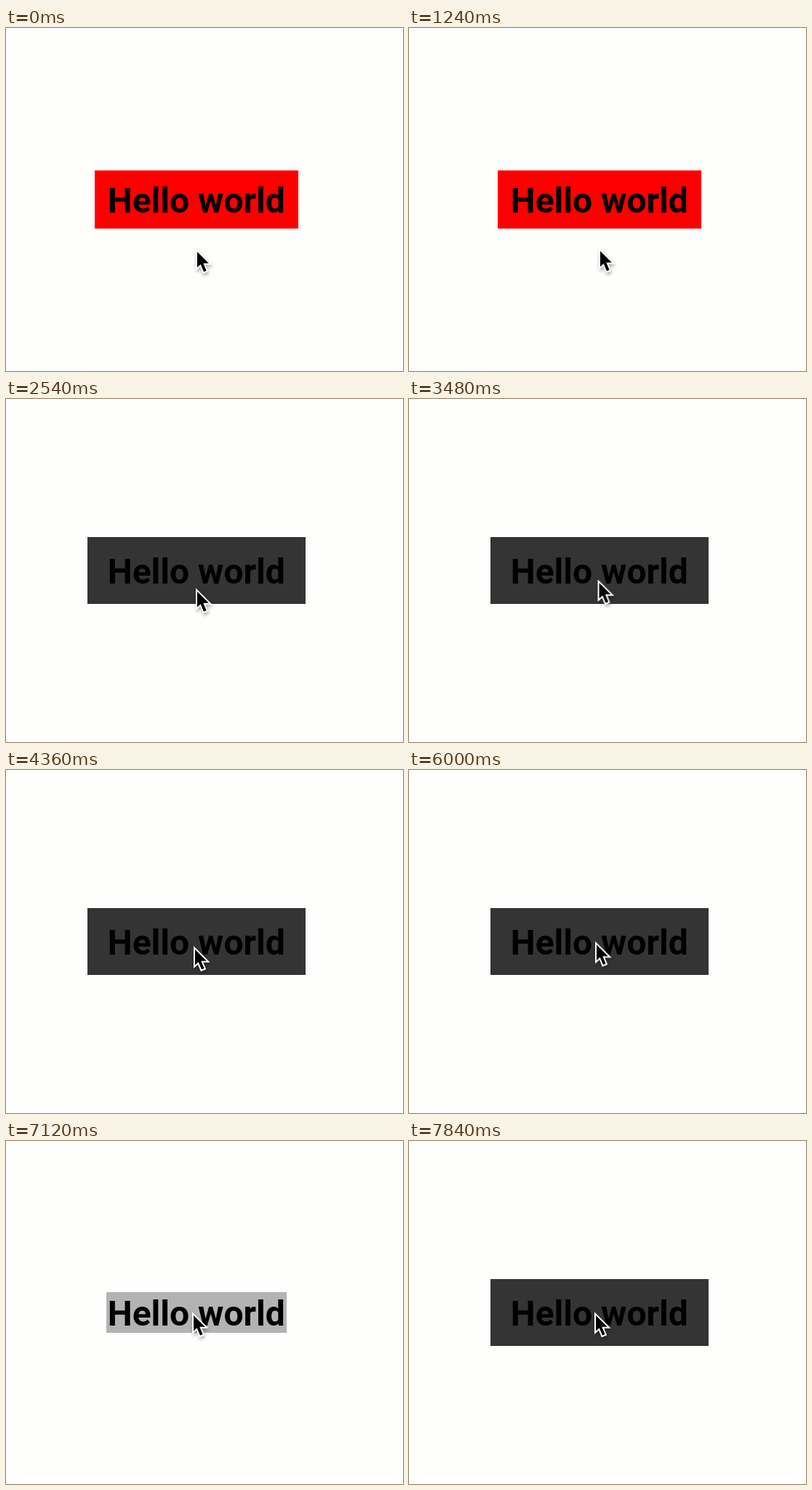
Write an HTML page that moves like this. It is 546 px wide and 472 px high and loops after 8 s.

```html
<!DOCTYPE html>
<html lang="en">
<head>
<meta charset="utf-8">
<title>Hello world</title>
<style>
  html, body { margin: 0; width: 100%; height: 100%; overflow: hidden; background: #fefefc; }
  #box, #label, #cursor { position: absolute; }
  #label { left: 0; top: 0; }
  #label text { font: 700 48px Roboto, Arial, sans-serif; }
  #cursor { left: 0; top: 0; overflow: visible; filter: drop-shadow(1px 3px 2px rgba(0, 0, 0, .3)); }
  #cursor path { stroke: #fff; stroke-width: 4; stroke-miterlimit: 8; paint-order: stroke; }
</style>
</head>
<body>
<div id="box"></div>
<svg id="label" width="546" height="472"><text x="139.7" y="254">Hello world</text></svg>
<svg id="cursor" width="24" height="38">
  <path d="M2 5V26.5L6.7 22.2L11 32.6L14.6 31.1L10.3 20.8H17.8Z"/>
</svg>
<script>
const LOOP = 8000;
const byId = id => document.getElementById(id);

// Box looks: padding around the text line, and colour
const look = (padX, padY, backgroundColor) => ({
  left: 138 - padX + 'px',
  top: 208 - padY + 'px',
  width: 248 + 2 * padX + 'px',
  height: 56 + 2 * padY + 'px',
  backgroundColor
});
const idle = look(16, 12, '#ff0000');
const hover = look(26, 18, '#343434');
const press = look(0, 0, '#b3b3b3');
const at = (x, y) => ({ transform: `translate(${x}px, ${y}px)` });

// Each step: [time in ms, style, easing towards the next step]
function play(el, steps) {
  const frames = steps.map(([ms, style, easing = 'linear']) =>
    ({ ...style, offset: ms / LOOP, easing }));
  el.animate(frames, { duration: LOOP, iterations: Infinity });
}

play(byId('box'), [
  [0, idle],
  [2090, idle, 'ease'],
  [2540, hover],
  [6420, hover, 'ease'],
  [6980, press],
  [7260, press, 'ease'],
  [7820, hover],
  [LOOP, hover]
]);

play(byId('cursor'), [
  [0, at(261, 303)],
  [160, at(261, 303)],
  [260, at(261, 304)],
  [400, at(261, 304)],
  [560, at(261, 303)],
  [1100, at(261, 303), 'ease-in-out'],
  [1840, at(261, 288)],
  [1940, at(261, 287)],
  [2080, at(261, 271), 'ease-out'],
  [2400, at(261, 260)],
  [2960, at(261, 260), 'ease-in-out'],
  [3760, at(259, 244)],
  [3920, at(258, 242)],
  [4460, at(258, 242), 'ease-in-out'],
  [5060, at(256, 235.5)],
  [6420, at(256, 235.5)],
  [7120, at(256, 235)],
  [7260, at(256, 235)],
  [7840, at(255, 235)],
  [LOOP, at(255, 235)]
]);
</script>
</body>
</html>
```
